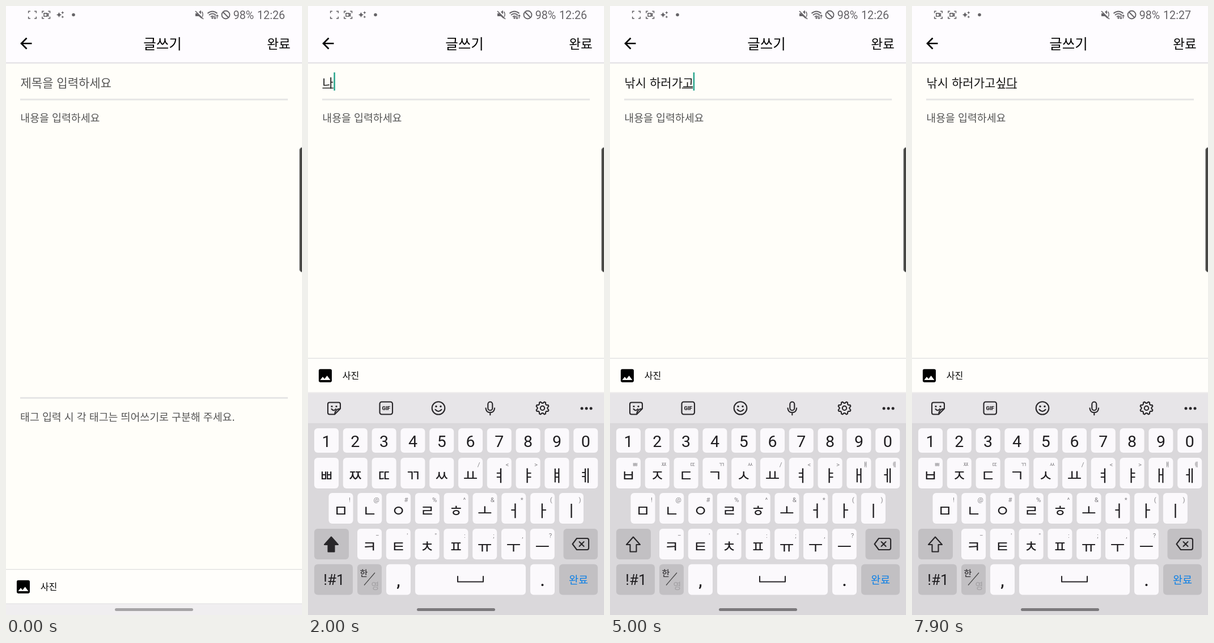
Write an HTML page that moves like this. It is 522 by 1073 pixels and loops after 8 s.

```html
<!DOCTYPE html>
<html lang="ko">
<head>
<meta charset="utf-8">
<title>글쓰기</title>
<style>
html, body { margin: 0; width: 100%; height: 100%; overflow: hidden; background: #fffef9; }
svg { display: block; }
text { font-family: "Noto Sans CJK KR", "Noto Sans CJK", sans-serif; }
.rb { font-family: Roboto, sans-serif; }
.mid { text-anchor: middle; }
.icon { fill: none; stroke: #29272a; stroke-width: 2.1; stroke-linecap: round; stroke-linejoin: round; }
.status { fill: none; stroke: #666468; stroke-width: 1.6; }
#pop { filter: drop-shadow(0 1px 2px rgba(0,0,0,.35)); }
</style>
</head>
<body>
<svg id="stage" width="522" height="1073" viewBox="0 0 522 1073">
  <rect width="522" height="1073" fill="#fffef9"/>
  <rect width="522" height="100" fill="#fefcff"/>
  <rect y="99" width="522" height="2.5" fill="#e6e4e7"/>

  <g class="status">
    <path id="corner" d="M39.7 12.5V9.2H43M50 9.2h3.3v3.3M53.3 18.7V22H50M43 22h-3.3v-3.3"/>
    <use href="#corner" x="24.2"/>
    <path id="camera" d="M42.8 12.9h5.2v5.4h-5.2zM48 15l2.4-1.6v4.4L48 16.2"/>
    <path d="M67 12.9h5.2v5.4H67zM72.200 15l2.400-1.600v4.400l-2.400-1.600"/>
    <path d="M355.500 13q8.500-7 17 0M358 16q6-5 12 0M361 19q3-2.500 6 0" stroke-width="2"/>
    <path d="M368.500 16.500v6m-2-2 2 2 2-2M372.500 22v-6m-2 2 2-2 2 2" stroke-width="1.300"/>
    <circle cx="387.500" cy="15.500" r="7" stroke-width="1.900"/>
    <path d="M382.500 10.500l10 10" stroke-width="1.900"/>
    <path d="M334 9l14 14" stroke-width="1.700"/>
    <path d="M345.500 10q3 4.500.6 9" stroke-width="1.500"/>
  </g>
  <g fill="#666468">
    <path d="M93.500 10.500q.8 4.200 5 5-4.200.8-5 5-.8-4.200-5-5 4.200-.8 5-5zM99.800 9q.4 2.300 2.700 2.700-2.300.4-2.700 2.700-.4-2.300-2.700-2.700 2.300-.4 2.700-2.700zM99.800 16.800q.4 2.100 2.500 2.500-2.100.4-2.500 2.500-.4-2.100-2.500-2.500 2.100-.4 2.500-2.500z"/>
    <circle cx="119" cy="15.500" r="2.800"/>
    <path d="M334 13h3.500l7.500 7.500v2l-5-4.500h-6zM340 10.500l4-3v7z"/>
    <circle cx="364" cy="21" r="1.700"/>
    <g class="rb" font-size="19.700">
      <text class="rb" x="400.700" y="22.500">98%</text>
      <text class="rb" id="clock" x="443" y="22.500">12:26</text>
    </g>
  </g>

  <path d="M45.500 66H28M36.500 56.500L27 66l9.500 9.500" fill="none" stroke="#000" stroke-width="2.700"/>
  <text class="mid" x="276" y="76" font-size="24.500" font-weight="500">글쓰기</text>
  <text class="mid" x="481" y="75" font-size="22.500" font-weight="500">완료</text>

  <text id="title" x="25.500" y="143" font-size="21" font-weight="500" xml:space="preserve"></text>
  <rect id="under" y="143.800" height="1.500" fill="#222"/>
  <rect id="caret" y="117" width="2.600" height="32" fill="#2fa890"/>
  <g fill="#e6e6e6">
    <rect x="25" y="163.300" width="472" height="3"/>
    <rect x="25" y="689" width="472" height="3"/>
  </g>
  <g fill="#555" font-size="18.350">
    <text x="25.300" y="203.500">내용을 입력하세요</text>
    <text x="25" y="731">태그 입력 시 각 태그는 띄어쓰기로 구분해 주세요.</text>
  </g>

  <rect y="1053" width="522" height="20" fill="#f0eef0"/>
  <g id="bar">
    <rect width="522" height="61" fill="#fffefb"/>
    <rect width="522" height="1.300" fill="#dfdfdf"/>
    <rect y="60.500" width="522" height="1" fill="#e2e0e2"/>
    <path transform="translate(15.100 16) scale(1.280)" d="M21 19V5c0-1.100-.9-2-2-2H5c-1.100 0-2 .9-2 2v14c0 1.100.9 2 2 2h14c1.100 0 2-.9 2-2zM8.500 13.500l2.500 3L14.500 12l4.500 6H5z"/>
    <text x="60.800" y="37" font-size="16">사진</text>
  </g>

  <g id="board">
    <rect y="682" width="522" height="391" fill="#dad8db"/>
    <rect y="682" width="522" height="53" fill="#e7e5e8"/>
    <g class="icon">
      <path d="M38 698.500h16q3 0 3 3v8q-9 0-10 10h-9q-3 0-3-3v-15q0-3 3-3zM57 709.500l-10 10M41.500 710q4 5 7.500 0"/>
      <rect x="126.500" y="697.500" width="22.500" height="22" rx="3.500"/>
      <circle cx="230" cy="708.500" r="11.300"/>
      <path d="M224.500 711q5.500 6.500 11 0"/>
      <rect x="317.300" y="697.500" width="8" height="15" rx="4"/>
      <path d="M313.500 708.500q.5 7.700 7.800 7.700t7.800-7.700M321.300 716.500v4"/>
      <circle cx="413.500" cy="708.500" r="3.700"/>
      <path id="gear"/>
    </g>
    <g fill="#29272a">
      <circle cx="42" cy="705.500" r="1.600"/><circle cx="50" cy="705.500" r="1.600"/>
      <circle cx="226" cy="705.500" r="1.700"/><circle cx="234" cy="705.500" r="1.700"/>
      <circle cx="483" cy="709" r="2.500"/><circle cx="491" cy="709" r="2.500"/><circle cx="499" cy="709" r="2.500"/>
      <text class="rb mid" x="137.700" y="712" font-size="9.500" font-weight="900">GIF</text>
    </g>
    <g id="keys"></g>
    <g fill="#1f1d20">
      <path d="M41 935.500l12 13.500h-6.500v12.500h-11V949H29z" class="icon" id="arrow"/>
      <path class="icon" d="M474 938h18q3 0 3 3v14q0 3-3 3h-18l-7.500-10zM478.500 944l8 8M486.500 944l-8 8"/>
      <text class="rb mid" x="46" y="1020" font-size="26">!#1</text>
      <text x="91.500" y="1004.500" font-size="15">한</text>
      <text x="111.500" y="1026.500" font-size="15" fill="#a19fa2">영</text>
      <path d="M99 1020.500l19-22" stroke="#444" stroke-width="1.200"/>
      <text class="rb mid" x="159.500" y="1022" font-size="29" font-weight="500">,</text>
      <text class="rb mid" x="413.500" y="1022" font-size="29" font-weight="500">.</text>
      <path class="icon" d="M264 1005v9.500h45V1005" stroke-linecap="butt"/>
      <text class="mid" x="477" y="1017.500" font-size="18.500" fill="#0a7fe6">완료</text>
    </g>
    <g id="pop">
      <rect width="78.500" height="102" rx="11" fill="#fbf9fc"/>
      <text class="mid" x="39.200" y="68" font-size="40" fill="#1f1d20"></text>
    </g>
  </g>
  <rect id="pill" x="192" y="1061" width="138" height="5" rx="2.500"/>
  <rect x="517.500" y="249" width="12" height="220" rx="5" fill="#484846" stroke="#b5b5b2"/>
</svg>
<script>
const $ = id => document.getElementById(id);
const LOOP = 8000, STEP = 100, EM = 21, LEFT = 25.5;
const LIGHT = '#fbf9fc', DARK = '#c2c0c3', DOWN = '#b1afb2';
const DOUBLE = { ㅂ: 'ㅃ', ㅈ: 'ㅉ', ㄷ: 'ㄸ', ㄱ: 'ㄲ', ㅅ: 'ㅆ', ㅐ: 'ㅒ', ㅔ: 'ㅖ' };
const keys = {};

function add(tag, attrs, text = '') {
  const el = document.createElementNS('http://www.w3.org/2000/svg', tag);
  for (const k in attrs) el.setAttribute(k, attrs[k]);
  el.textContent = text;
  return $('keys').appendChild(el);
}

function key(name, x, y, width, height, color = LIGHT) {
  const rect = add('rect', { x, y, width, height, rx: 6, fill: color });
  return keys[name] = { rect, color, x: x + width / 2, y };
}

// y, height, x of the first key, labels, corner hints
const ROWS = [
  [744, 43, 11, '1234567890', ''],
  [796, 54, 11, 'ㅂㅈㄷㄱㅅㅛㅕㅑㅐㅔ', 'ㅃㅉㄸㄲㅆ/<>ㅒㅖ'],
  [858, 54, 36.5, 'ㅁㄴㅇㄹㅎㅗㅓㅏㅣ', '!@#%^&*()'],
  [921, 54, 87, 'ㅋㅌㅊㅍㅠㅜㅡ', '−\'":;,?']
];
for (const [y, h, x0, labels, hints] of ROWS) {
  [...labels].forEach((c, i) => {
    const x = x0 + i * 50.8, k = key(c, x, y, 43, h), digit = !hints;
    k.label = add('text', {
      class: digit ? 'rb mid' : 'mid', x: k.x, y: y + (digit ? 33 : 41.5),
      'font-size': digit ? 28.5 : 28, fill: '#1f1d20'
    }, c);
    if (hints) k.hint = add('text', {
      class: 'rb', x: x + 38.5, y: y + 15.5, 'text-anchor': 'end', 'font-size': 11.5, fill: '#858387'
    }, hints[i]);
  });
}
key('shift', 11, 921, 61, 54, DARK);
key('del', 450.5, 921, 60.5, 54, DARK);
key('sym', 11, 983.5, 68, 54, DARK);
key('lang', 87, 983.5, 43, 54, DARK);
key(',', 138, 983.5, 43, 54);
key('space', 189, 983.5, 195, 54);
key('.', 392, 983.5, 43, 54);
key('done', 443, 983.5, 68, 54, DARK);

const teeth = [];
for (let i = 0; i < 32; i++) {
  const a = (i + .5) * Math.PI / 16, r = i % 4 === 1 || i % 4 === 2 ? 11.4 : 8.9;
  teeth.push((413.5 + r * Math.sin(a)).toFixed(1) + ' ' + (708.5 - r * Math.cos(a)).toFixed(1));
}
$('gear').setAttribute('d', 'M' + teeth.join('L') + 'Z');

// press time, hold, key, text one step later
const PRESSES = [
  [1500, 200, 'ㄴ', 'ㄴ'], [1700, 200, 'ㅏ', '나'], [1900, 100, 'shift'], [2100, 200, 'ㄱ', '낚'],
  [2500, 200, 'ㅅ', '낚ㅅ'], [2700, 200, 'ㅣ', '낚시'], [3100, 100, 'space', '낚시 '],
  [3400, 100, 'ㅎ', '낚시 ㅎ'], [3500, 300, 'ㅏ', '낚시 하'], [4000, 200, 'ㄹ', '낚시 할'],
  [4200, 200, 'ㅓ', '낚시 하러'], [4400, 100, 'ㄱ', '낚시 하럭'], [4500, 200, 'ㅏ', '낚시 하러가'],
  [4700, 100, 'ㄱ', '낚시 하러각'], [4800, 200, 'ㅗ', '낚시 하러가고'], [5100, 200, 'ㅅ', '낚시 하러가곳'],
  [5300, 200, 'ㅣ', '낚시 하러가고시'], [5600, 200, 'ㅍ', '낚시 하러가고싶'], [5900, 200, 'ㄱ', '낚시 하러가고싶ㄱ'],
  [6700, 100, 'del', '낚시 하러가고싶'], [6800, 200, 'ㄷ', '낚시 하러가고싶ㄷ'], [7000, 200, 'ㅏ', '낚시 하러가고싶다']
];

const show = (el, on) => el.setAttribute('visibility', on ? 'inherit' : 'hidden');
const advance = s => [...s].reduce((w, c) => w + (c === ' ' ? .224 : .92) * EM, 0);

function drawTitle(t) {
  let text = '', edit = 700;
  for (const [at, , , s] of PRESSES) if (s && t >= at + STEP) { text = s; edit = at + STEP; }
  $('title').textContent = text || '제목을 입력하세요';
  $('title').setAttribute('fill', text ? '#151515' : '#555');
  const end = LEFT + advance(text), last = text.slice(-1);
  const composing = last.trim() !== '';
  show($('under'), composing);
  if (composing) {
    $('under').setAttribute('x', end - .92 * EM);
    $('under').setAttribute('width', .92 * EM);
  }
  $('caret').setAttribute('x', end + .5);
  show($('caret'), t >= 700 && Math.floor((t - edit) / 500) % 2 === 0);
}

function drawKeys(t) {
  const shifted = t >= 2000 && t < 2300;
  const hit = PRESSES.filter(([at, hold]) => t >= at && t < at + hold).pop();
  const down = hit && hit[2];
  for (const name in keys) {
    const k = keys[name];
    k.rect.setAttribute('fill', name === down ? DOWN : k.color);
    if (DOUBLE[name]) {
      k.label.textContent = shifted ? DOUBLE[name] : name;
      show(k.hint, !shifted);
    }
  }
  $('arrow').style.fill = shifted ? '#29272a' : 'none';
  const k = keys[down], pop = k && k.label;
  show($('pop'), pop);
  if (pop) {
    $('pop').setAttribute('transform', `translate(${k.x - 39.2} ${k.y - 110.5})`);
    $('pop').lastElementChild.textContent = k.label.textContent;
  }
}

function draw(t) {
  const p = Math.min(1, Math.max(0, (t - 720) / 380));
  const top = 682 + 391 * (1 - p) ** 3;
  $('board').setAttribute('transform', `translate(0 ${top - 682})`);
  $('bar').setAttribute('transform', `translate(0 ${Math.min(992, top - 62)})`);
  $('pill').setAttribute('fill', p > 0 ? '#7b797c' : '#a6a4a6');
  show($('camera'), t % 1000 >= 500);
  $('clock').textContent = t < 6200 ? '12:26' : '12:27';
  drawTitle(t);
  drawKeys(t);
}

const start = performance.now();
function tick() {
  const t = (performance.now() - start) % LOOP;
  draw(Math.floor(t / STEP) * STEP);
  requestAnimationFrame(tick);
}
tick();
</script>
</body>
</html>
```
